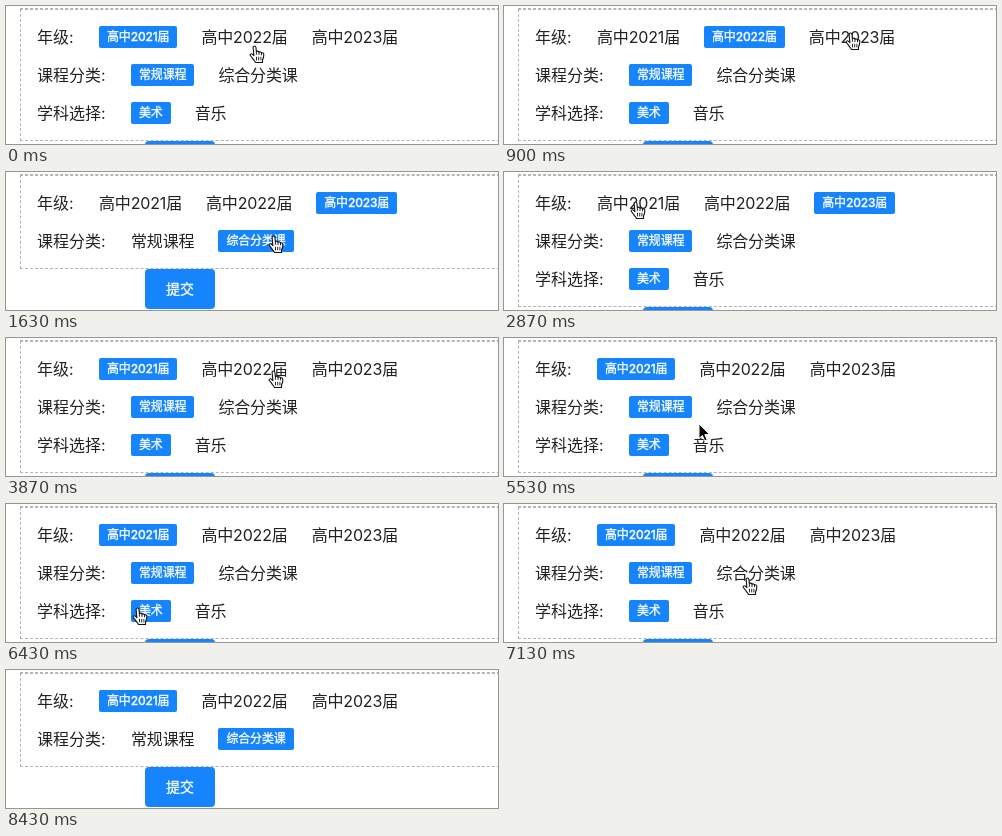
Animation, 492 px wide and 138 px high, one loop 8.96 s. Source, as an HTML page:

```html
<!DOCTYPE html>
<html lang="zh-CN">
<head>
<meta charset="utf-8">
<title>级联选项</title>
<style>
  html, body { margin: 0; width: 100%; height: 100%; overflow: hidden; background: #fff; }
  #stage {
    position: relative; width: 492px; height: 138px; overflow: hidden;
    font: 16px/22px Inter, "Noto Sans CJK SC", "Noto Sans CJK", sans-serif; color: #222;
  }
  #stage > * { position: absolute; white-space: nowrap; }
  .above { left: 14px; top: 2px; width: 500px; border-top: 1px dashed #b4b4b4; }
  #panel { box-sizing: border-box; left: 14px; top: 3px; width: 500px; border: 1px dashed #b4b4b4; }
  .label { left: 31px; }
  .items { display: flex; gap: 24px; height: 22px; letter-spacing: -.01em; }
  .on, #submit { background: #1684fc; color: #fff; font-weight: 500; -webkit-text-stroke: .3px #fff; }
  .on { padding: 0 8px; border-radius: 2px; font-size: 12px; }
  #submit {
    left: 139px; width: 70px; height: 40px; border-radius: 4px;
    font-size: 14px; line-height: 40px; text-align: center;
  }
  #submit.hover { background: #409cff; }
  #cursor { left: 0; top: 0; width: 24px; height: 24px; overflow: visible; pointer-events: none; }
  #cursor path { stroke-linejoin: round; stroke-linecap: round; }
</style>
</head>
<body>
<div id="stage">
  <div class="above"></div>
  <div id="panel"></div>
  <div id="submit">提交</div>
  <svg id="cursor">
    <g id="hand" transform="translate(-.5 -1)">
      <path d="M-1.4 1.3C-1.4-.4 1.3-.4 1.4 1.3L1.9 5.6C2.6 4.8 4.2 5 4.5 6.2C5.4 5.5 6.8 5.9 7 7C8 6.5 9.3 7.1 9.3 8.4C9.4 11 8.9 12.3 8 14V16.5H1L0 14.8C-1.6 13.2-2.3 11.4-4.1 9.6C-5 8.4-3.4 7.2-2.2 8.2L-.6 9.7Z"
        fill="#fff" stroke="#111" stroke-width="1.1"/>
      <path d="M1.9 5.6V8.4M4.5 6.2V8.6M7 7V8.9M2 11.2V14M4.2 11.2V14M6.4 11.2V14" fill="none" stroke="#111" stroke-width=".9"/>
    </g>
    <path id="arrow" d="M0 0V14.6L3.4 11.5L5.7 16.8L8.1 15.8L5.8 10.6H10.3Z" fill="#000" stroke="#fff"/>
  </svg>
</div>
<script>
const LOOP = 8960;
const HIDE_AT = 8430;
const ROW_GAP = 38;
const CLICK_LAG = 140;  // rest between arriving and clicking
const MAX_TRIP = 400;
const GRADE = 0, COURSE = 1;

const rows = [
  { label: '年级:', left: 93, items: ['高中2021届', '高中2022届', '高中2023届'] },
  { label: '课程分类:', left: 125, items: ['常规课程', '综合分类课'] },
  { label: '学科选择:', left: 125, items: ['美术', '音乐'] }
];

const stop = (at, x, y, row, item) => ({ at, x, y, row, item });
const stops = [
  stop(0, 249, 41),
  stop(230, 249, 36, GRADE, 1),
  stop(570, 262, 17),
  stop(990, 350, 28, GRADE, 2),
  stop(1460, 268, 65, COURSE, 1),
  stop(2230, 184, 68, COURSE, 0),
  stop(2830, 132, 31, GRADE, 0),
  stop(3650, 215, 35),
  stop(4100, 303, 33),
  stop(4390, 370, 25, GRADE, 2),
  stop(5230, 127, 34, GRADE, 0),
  stop(5530, 195, 86),
  stop(6000, 150, 106),
  stop(6680, 126, 105),
  stop(7130, 244, 75, COURSE, 1),
  stop(8030, 178, 112),
  stop(8400, 458, 66)
];

const $ = id => document.getElementById(id);
const stage = $('stage');

function add(className, left, top) {
  const el = document.createElement('div');
  el.className = className;
  el.style.left = left + 'px';
  el.style.top = top + 'px';
  stage.insertBefore(el, $('submit'));
  return el;
}

rows.forEach((row, i) => {
  const top = 20 + i * ROW_GAP;
  row.labelEl = add('label', 31, top);
  row.labelEl.textContent = row.label;
  row.list = add('items', row.left, top);
  row.els = row.items.map(text => {
    const el = document.createElement('span');
    el.textContent = text;
    return row.list.appendChild(el);
  });
});

function selectionAt(t) {
  const picked = [0, 0, 0];
  for (const s of stops) {
    if (s.row !== undefined && s.at + CLICK_LAG <= t) picked[s.row] = s.item;
  }
  return picked;
}

function cursorAt(t) {
  const i = stops.findLastIndex(s => s.at <= t);
  const a = stops[i], b = stops[i + 1] || a;
  const begin = Math.max(a.at + CLICK_LAG, b.at - MAX_TRIP);
  const p = t > begin && b !== a ? (t - begin) / (b.at - begin) : 0;
  const k = 1 - (1 - p) ** 3;
  return [a.x + (b.x - a.x) * k, a.y + (b.y - a.y) * k].map(Math.round);
}

function draw(t) {
  const picked = selectionAt(t);
  rows.forEach((row, r) => row.els.forEach((el, i) => el.classList.toggle('on', i === picked[r])));

  // The subject row belongs to the first course type only.
  const open = picked[COURSE] === 0;
  rows[2].labelEl.hidden = !open;
  rows[2].list.style.display = open ? '' : 'none';
  $('panel').style.height = (open ? 132 : 94) + 'px';
  $('submit').style.top = (open ? 135 : 97) + 'px';

  const [x, y] = cursorAt(t);
  const hit = document.elementFromPoint(x, y);
  const link = !!hit && hit.matches('.items span, #submit');
  $('submit').classList.toggle('hover', hit === $('submit') && t < HIDE_AT);
  $('cursor').style.transform = `translate(${x}px, ${y}px)`;
  $('cursor').style.display = t < HIDE_AT ? '' : 'none';
  $('hand').style.display = link ? '' : 'none';
  $('arrow').style.display = link ? 'none' : '';
}

const start = performance.now();
function tick() {
  draw((performance.now() - start) % LOOP);
  requestAnimationFrame(tick);
}
tick();
</script>
</body>
</html>
```
